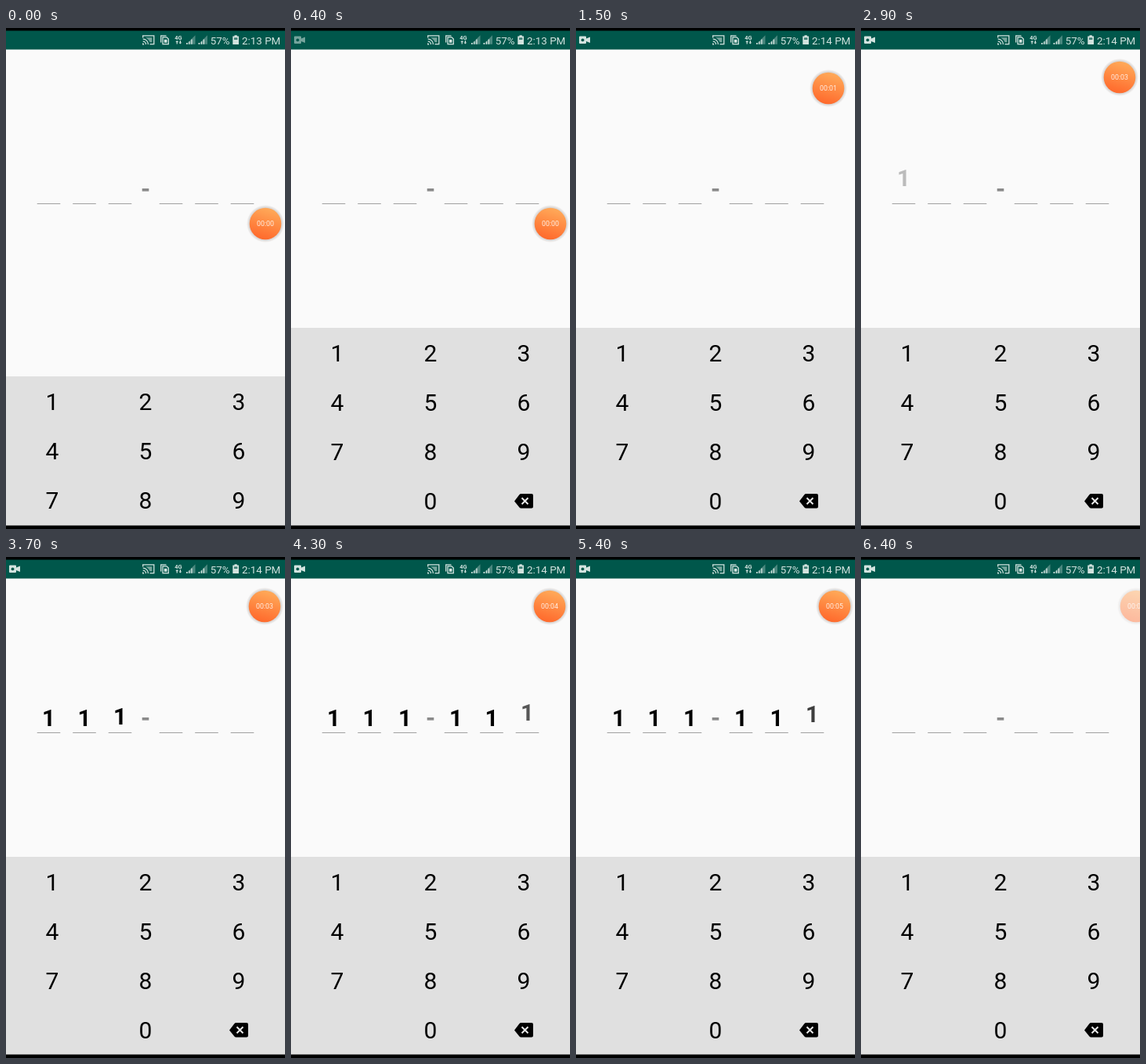
An HTML page that plays this animation: 356 by 640 pixels, repeating every 8 s.

```html
<!DOCTYPE html>
<html lang="en">
<head>
<meta charset="utf-8">
<title>PIN entry</title>
<style>
html, body { margin: 0; width: 100%; height: 100%; overflow: hidden; background: #fafafa; }
svg { display: block; width: 100vw; height: 100vh; font-family: Roboto, Arial, sans-serif; }

/* Every pose is held for a 100 ms tick; 1.25% is one tick. */
.pad, .cam, .bubble, .row, .ink, .enter, .leave, .data {
  animation: 8s step-end -.03s infinite;
}
.pad { animation-name: rise; }
.cam { animation-name: appear; }
.bubble { animation-name: drag; }
.row { animation-name: shake; }
.ink { --ink: #000; fill: var(--ink); animation-name: alert; }
.dash { --ink: #8a8a8a; }
.data { animation-name: idle; }
.enter { opacity: 0; animation-name: enter; animation-delay: calc(var(--in) - .03s); }
.leave { animation-name: leave; animation-delay: calc(var(--out) - .03s); }

.key { font-size: 30px; text-anchor: middle; }
.digit { font-size: 29.5px; font-weight: 700; text-anchor: middle; }
.status { font-size: 13.4px; }

@keyframes rise {
  0% { transform: translateY(62px); }
  1.25% { transform: translateY(38px); }
  2.5% { transform: translateY(18px); }
  3.75% { transform: translateY(6px); }
  5%, 100% { transform: none; }
}
@keyframes appear {
  0% { opacity: 0; }
  2.5% { opacity: .25; }
  5% { opacity: .55; }
  6.25% { opacity: .8; }
  7.5%, 100% { opacity: 1; }
}
@keyframes drag {
  0% { transform: translate(331px, 250px); opacity: 1; }
  16.25% { transform: translate(328px, 196px); }
  17.5% { transform: translate(324px, 122px); }
  18.75% { transform: translate(322px, 77px); }
  20% { transform: translate(322px, 67px); }
  21.25% { transform: translate(325px, 63px); }
  22.5% { transform: translate(328px, 63px); }
  23.75% { transform: translate(330px, 63px); opacity: 1; }
  73.75% { transform: translate(336px, 63px); opacity: .85; }
  75% { transform: translate(343px, 63px); opacity: .68; }
  76.25% { transform: translate(348px, 63px); opacity: .54; }
  77.5%, 100% { transform: translate(351px, 63px); opacity: .45; }
}
@keyframes shake {
  0% { transform: none; }
  56.25% { transform: translateX(8px); }
  57.5% { transform: translateX(-17px); }
  58.75% { transform: translateX(17.4px); }
  60% { transform: translateX(-15px); }
  61.25% { transform: translateX(10px); }
  62.5% { transform: translateX(-8px); }
  63.75% { transform: translateX(4px); }
  65%, 100% { transform: none; }
}
@keyframes alert {
  0% { fill: var(--ink); }
  56.25% { fill: #e5303b; }
  65%, 100% { fill: var(--ink); }
}
@keyframes idle {
  0% { opacity: 1; }
  57.5% { opacity: .4; }
  62.5%, 100% { opacity: 1; }
}
@keyframes enter {
  0% { transform: translateY(-14px); opacity: .25; }
  1.25% { transform: translateY(-7px); opacity: .65; }
  2.5% { transform: translateY(-2px); opacity: 1; }
  3.75% { transform: none; opacity: 1; }
  45%, 100% { transform: none; opacity: 0; }
}
@keyframes leave {
  0% { transform: translateY(-5px); opacity: .75; }
  1.25% { transform: translateY(-12px); opacity: .4; }
  2.5% { transform: translateY(-18px); opacity: .12; }
  3.75% { transform: translateY(-20px); opacity: 0; }
  32%, 100% { transform: none; opacity: 1; }
}
</style>
</head>
<body>
<svg viewBox="0 0 356 640">
  <defs>
    <linearGradient id="orange" x1=".65" y1="0" x2=".35" y2="1">
      <stop offset="0" stop-color="#ffab5a"/>
      <stop offset="1" stop-color="#ff682b"/>
    </linearGradient>
    <radialGradient id="halo">
      <stop offset=".86" stop-color="#d8d4d2"/>
      <stop offset="1" stop-color="#d8d4d2" stop-opacity="0"/>
    </radialGradient>
  </defs>
  <rect width="356" height="640" fill="#fafafa"/>

  <g class="row">
    <g id="lines" fill="#a0a0a0"></g>
    <rect class="ink dash" x="173.7" y="205" width="8.6" height="3.6"/>
    <g id="digits" class="ink"></g>
  </g>

  <g class="pad">
    <rect y="383" width="356" height="257" fill="#e0e0e0"/>
    <g id="keys"></g>
    <path d="M285 604.5L291.5 596Q292.3 595 293.5 595H307Q309 595 309 597V611.5Q309 613.5 307 613.5H293.5Q292.3 613.5 291.5 612.5Z"/>
    <path d="M294.5 600.2l8 8m0-8l-8 8" stroke="#e8e8e8" stroke-width="2"/>
  </g>

  <rect width="356" height="27.5" fill="#00574b"/>
  <rect width="356" height="3.5"/>
  <rect y="635.5" width="356" height="4.5"/>

  <g fill="#d3e3df">
    <g class="cam">
      <path d="M5 10.5H12Q13 10.5 13 11.5V13.5L18 11.5V19L13 17V19Q13 20 12 20H5Q4 20 4 19V11.5Q4 10.5 5 10.5Z"/>
      <circle cx="8.5" cy="15.3" r="1.9" fill="#00574b"/>
    </g>
    <g fill="none" stroke="#d3e3df" stroke-width="1.3">
      <path d="M174.7 12.5V9.8H188.8V20.7H183.5M174.7 14.2A6.5 6.5 0 0 1 181.4 20.9M174.7 17.1A3.8 3.8 0 0 1 178.5 20.9"/>
      <path d="M197.7 18.5V9.8H204.5M200 11.8H205L207.3 14V20.6H200Z"/>
    </g>
    <path d="M178 12.3H186.3V18.3H183.6Q182.4 14.6 178 12.3Z" opacity=".55"/>
    <path d="M174.1 19.2A2.2 2.2 0 0 1 176.3 21.4H174.1ZM201.8 14.7H205.5V18.8H201.8Z"/>
    <text x="215.3" y="15" font-size="7.4" font-weight="700">4G</text>
    <path class="data" d="M216.3 18L218.2 16L220.1 18ZM217.6 18h1.2v2.6h-1.2ZM220.5 18.6L222.4 20.6L224.3 18.6ZM221.8 16h1.2v2.6h-1.2Z"/>
    <g id="signals"></g>
    <path d="M291.5 9.3H294.8V10.6H297V21H289.3V10.6H291.5Z"/>
    <path d="M291 12.3H295.4V15H291Z" fill="#00574b" opacity=".7"/>
    <text class="status" x="260.8" y="20.6">57%</text>
    <text class="status" id="clock" x="301" y="20.6">2:13 PM</text>
  </g>

  <g class="bubble">
    <circle r="24" fill="url(#halo)"/>
    <circle r="20.3" fill="url(#orange)"/>
    <text id="timer" y="3.2" font-size="8.8" text-anchor="middle" fill="#fff" opacity=".85">00:00</text>
  </g>
</svg>
<script>
const start = performance.now();
const $ = id => document.getElementById(id);

const slots = [54.5, 100, 145.5, 210.5, 256, 301.5];
const typed = [2.9, 3.2, 3.5, 3.8, 4, 4.2];
$('lines').innerHTML = slots.map(x =>
  `<rect x="${x - 14.8}" y="224" width="29.6" height="1"/>`).join('');
$('digits').innerHTML = slots.map((x, i) =>
  `<g class="enter" style="--in:${typed[i]}s"><g class="leave" style="--out:${5.9 - i / 10}s">
   <text class="digit" x="${x}" y="216">1</text></g></g>`).join('');

$('keys').innerHTML = [...'123456789 0'].map((key, i) =>
  `<text class="key" x="${59 + i % 3 * 119}" y="${426 + Math.floor(i / 3) * 63.1}">${key}</text>`).join('');

$('signals').innerHTML = [230, 245.5].map(x =>
  `<path d="M${x} 20.8L${x + 11.5} 9.3V20.8Z" opacity=".35"/>
   <path d="M${x} 19h1.6v1.8h-1.6ZM${x + 3.4} 17.2h1.3v3.6h-1.3ZM${x + 6.2} 14.5h1.4v6.3h-1.4Z"/>`).join('');

// Recording counter and clock; the counter turns over at 900 ms past each second.
function tick() {
  const t = (performance.now() - start + 30) % 8000;
  const secs = Math.min(6, Math.floor((t + 100) / 1000));
  $('timer').textContent = '00:0' + secs;
  $('clock').textContent = t < 900 ? '2:13 PM' : '2:14 PM';
  requestAnimationFrame(tick);
}
tick();
</script>
</body>
</html>
```
